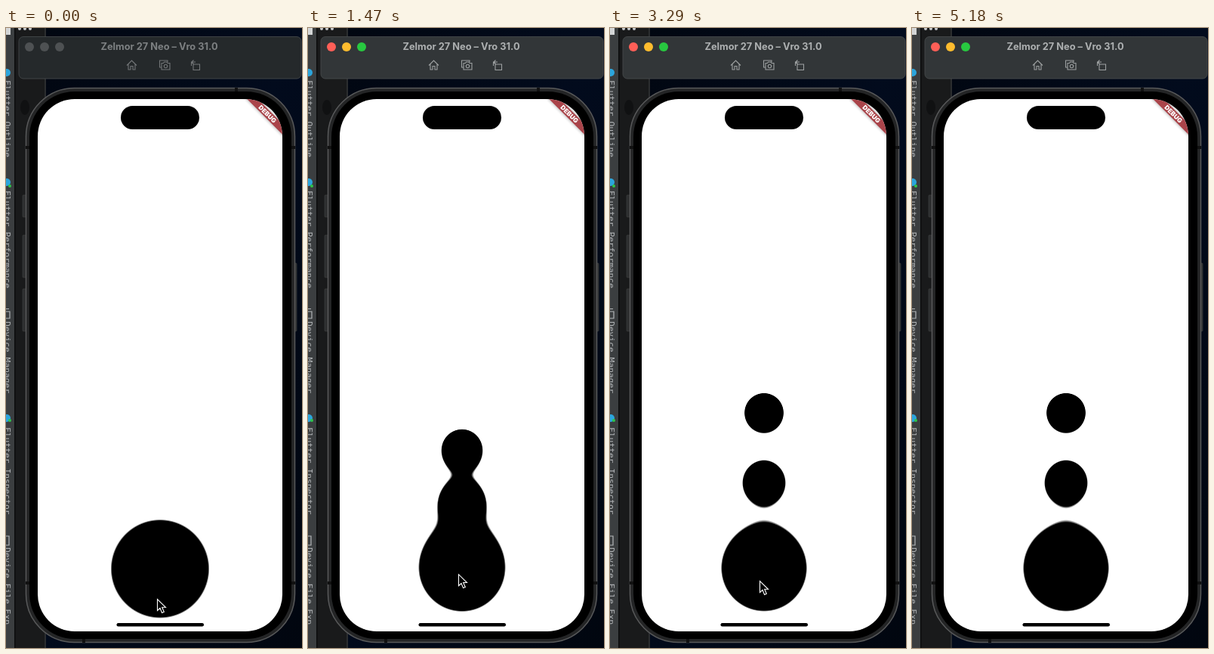
Recreate the animation shown at these times as an HTML page with a canvas. Size 392x820 px, loop 5.39 s.

```html
<!DOCTYPE html>
<html lang="en">
<head>
<meta charset="utf-8">
<title>Gooey menu</title>
<style>
  html, body { margin: 0; width: 100%; height: 100%; overflow: hidden; background: #020a1a; }
  svg, canvas { position: absolute; left: 0; top: 0; display: block; }
  #goo { left: 136px; top: 476px; }
  .side { font: 11.3px "DejaVu Sans Mono", monospace; fill: #b4b7b9; }
  .title { font: 700 12.8px Inter, sans-serif; fill: #adb0b1; }
  .bar { fill: #323638; }
  .icons { fill: none; stroke: #9da0a1; stroke-width: 1.1; }
  .idle .bar { fill: #25292b; }
  .idle .title { fill: #7d8082; }
  .idle .icons { stroke: #737678; }
  .idle .lights circle { fill: #4e5153; }
</style>
</head>
<body>
<svg id="scene" class="idle" width="392" height="820">
  <defs>
    <linearGradient id="sky" x2="1" y2="1">
      <stop offset="0" stop-color="#01060f"/>
      <stop offset=".5" stop-color="#020b1d"/>
      <stop offset="1" stop-color="#01060f"/>
    </linearGradient>
    <clipPath id="screen"><rect x="42" y="94" width="324" height="704" rx="49"/></clipPath>
  </defs>
  <rect width="392" height="820" fill="url(#sky)"/>

  <!-- editor side bar -->
  <rect width="53" height="820" fill="#191a1b"/>
  <rect width="11" height="820" fill="#3b3e40"/>
  <rect x="11" width="1.5" height="820" fill="#0c0d0e"/>
  <rect x="51" width="2" height="820" fill="#2b2d2f"/>
  <rect width="6" height="9" fill="#d3d5d6"/>
  <g fill="#c6c8ca"><circle cx="18" cy="1" r="2"/><circle cx="25" cy="1" r="2"/><circle cx="32" cy="1" r="2"/></g>
  <ellipse cx="25" cy="105" rx="6" ry="10" fill="#101112"/>
  <g fill="#2ca5dc"><circle cx="1" cy="59" r="5"/><circle cx="1" cy="204" r="5"/><circle cx="1" cy="516" r="5"/></g>
  <g fill="#2fc44a"><circle cx="5" cy="209" r="2"/><circle cx="5" cy="519" r="2"/></g>
  <path d="M-3 375H5V384H-3M0 371.500H4M-3 672H4V684H-3" fill="none" stroke="#b4b7b9" stroke-width="1.200"/>
  <g id="labels" class="side"></g>

  <!-- window bar -->
  <rect class="bar" x="17" y="11.500" width="374" height="55.500" rx="6" stroke="#4a4d4f" stroke-width=".8"/>
  <g class="lights">
    <circle cx="31" cy="25" r="6" fill="#ff5f57"/>
    <circle cx="51" cy="25" r="6" fill="#febc2e"/>
    <circle cx="71" cy="25" r="6" fill="#28c840"/>
  </g>
  <text class="title" x="203" y="29" text-anchor="middle">Zelmor 27 Neo – Vro 31.0</text>
  <g class="icons">
    <path d="M160 49.500L166.500 43L173 49.500M162 48V55H165V50.500H168V55H171V48"/>
    <path d="M205.500 52H203.500V43H214V45M206 46.500H208.500L209.500 45H213L214 46.500H217V55H206Z"/>
    <circle cx="211.500" cy="50.500" r="2.200"/>
    <path d="M248 48H256.500V55.500H248ZM245.500 50V45H251M248.500 42.500L245.800 45L248.500 47.500"/>
  </g>

  <!-- phone -->
  <g fill="#2d2e2f" stroke="#424344" stroke-width=".6">
    <rect x="22" y="221" width="6" height="29" rx="1"/>
    <rect x="22" y="274" width="6" height="56" rx="1"/>
    <rect x="22" y="345" width="6" height="56" rx="1"/>
    <rect x="380" y="311" width="5" height="90" rx="1"/>
  </g>
  <rect x="26.500" y="79.500" width="356" height="733" rx="64" fill="#242526" stroke="#58595a" stroke-width="1.500"/>
  <path d="M26 158H31M378 158H383M26 734H31M378 734H383M305 79V84M103 808V813" stroke="#111" stroke-width="4"/>
  <rect x="31" y="84" width="347" height="724" rx="60"/>
  <rect x="42" y="94" width="324" height="704" rx="49" fill="#fff"/>
  <rect x="152" y="103" width="104" height="31" rx="15.500"/>
  <rect x="146.500" y="787" width="115.500" height="4.500" rx="2.200"/>
  <g clip-path="url(#screen)">
    <g transform="translate(366 94) rotate(45)">
      <rect x="-40" y="23" width="80" height="10" fill="#aa444a" style="filter:drop-shadow(0 0 2px #0006)"/>
      <text y="31" text-anchor="middle" fill="#fff" style="font:900 8.400px Inter,sans-serif">DEBUG</text>
    </g>
  </g>
</svg>
<canvas id="goo" width="136" height="310"></canvas>
<svg width="392" height="820">
  <path id="cursor" d="M.5 .5V15.500L4 12.300L6.600 18.400L9.300 17.200L6.700 11.300H11.500Z" fill="#000" stroke="#fff" stroke-width="1.100"/>
</svg>
<script>
const STEP = 70, LOOP = 5390, LAST = 5180;
const LEFT = 136, TOP = 476, CX = 204, CY = 715.3;
const balls = [{ r2: 3008, rise: 0 }, { r2: 576, rise: 115 }, { r2: 576, rise: 207 }];
const $ = id => document.getElementById(id);
const clamp = v => Math.min(1, Math.max(0, v));

[[69, 'Flutter Outline'], [215, 'Flutter Performance'], [388, 'Device Manager'],
 [528, 'Flutter Inspector'], [687, 'Device File Exp.']].forEach(([y, label]) => {
  const text = document.createElementNS('http://www.w3.org/2000/svg', 'text');
  text.setAttribute('transform', `translate(-2 ${y}) rotate(90)`);
  text.textContent = label;
  $('labels').append(text);
});

const rise = u => clamp(u) ** 1.35;
const fall = u => {
  const w = clamp(u) ** 1.77;
  return w * w * (3 - 2 * w);
};

// How far the menu is open, 0 to 1
function openness(t) {
  let p = 0;
  for (const start of [203, 2290, 4320]) p += rise((t - start) / 630);
  for (const start of [1085, 3250]) p -= fall((t - start) / 740);
  return p;
}

const path = [[0, 200, 755], [70, 200, 755], [420, 199, 723], [1750, 199, 722],
  [2030, 198, 731], [4970, 198, 731], [5180, 198, 824]];

function cursorAt(t) {
  const i = Math.max(1, path.findIndex(k => k[0] >= t));
  const [t0, x0, y0] = path[i - 1], [t1, x1, y1] = path[i];
  const u = (t - t0) / (t1 - t0);
  return [x0 + (x1 - x0) * u, y0 + (y1 - y0) * u];
}

const ctx = $('goo').getContext('2d');
const img = ctx.createImageData(136, 310);

// Metaballs: each adds r² / d², the surface lies where the sum is 1
function drawGoo(p) {
  const centers = balls.map(b => CY - b.rise * p);
  for (let y = 0, n = 3; y < img.height; y++) {
    for (let x = 0; x < img.width; x++, n += 4) {
      const dx = x + LEFT + 0.5 - CX;
      let sum = 0;
      balls.forEach((b, i) => {
        const dy = y + TOP + 0.5 - centers[i];
        sum += b.r2 / (dx * dx + dy * dy + 1e-6);
      });
      img.data[n] = 255 * clamp((sum - 0.97) / 0.055);
    }
  }
  ctx.putImageData(img, 0, 0);
}

let shown = -1;
function frame(now) {
  const t = Math.min(LAST, Math.floor(now % LOOP / STEP) * STEP);
  if (t !== shown) {
    shown = t;
    $('scene').classList.toggle('idle', t < 70);
    drawGoo(openness(t));
    $('cursor').setAttribute('transform', `translate(${cursorAt(t)})`);
  }
  requestAnimationFrame(frame);
}
frame(performance.now());
</script>
</body>
</html>
```
